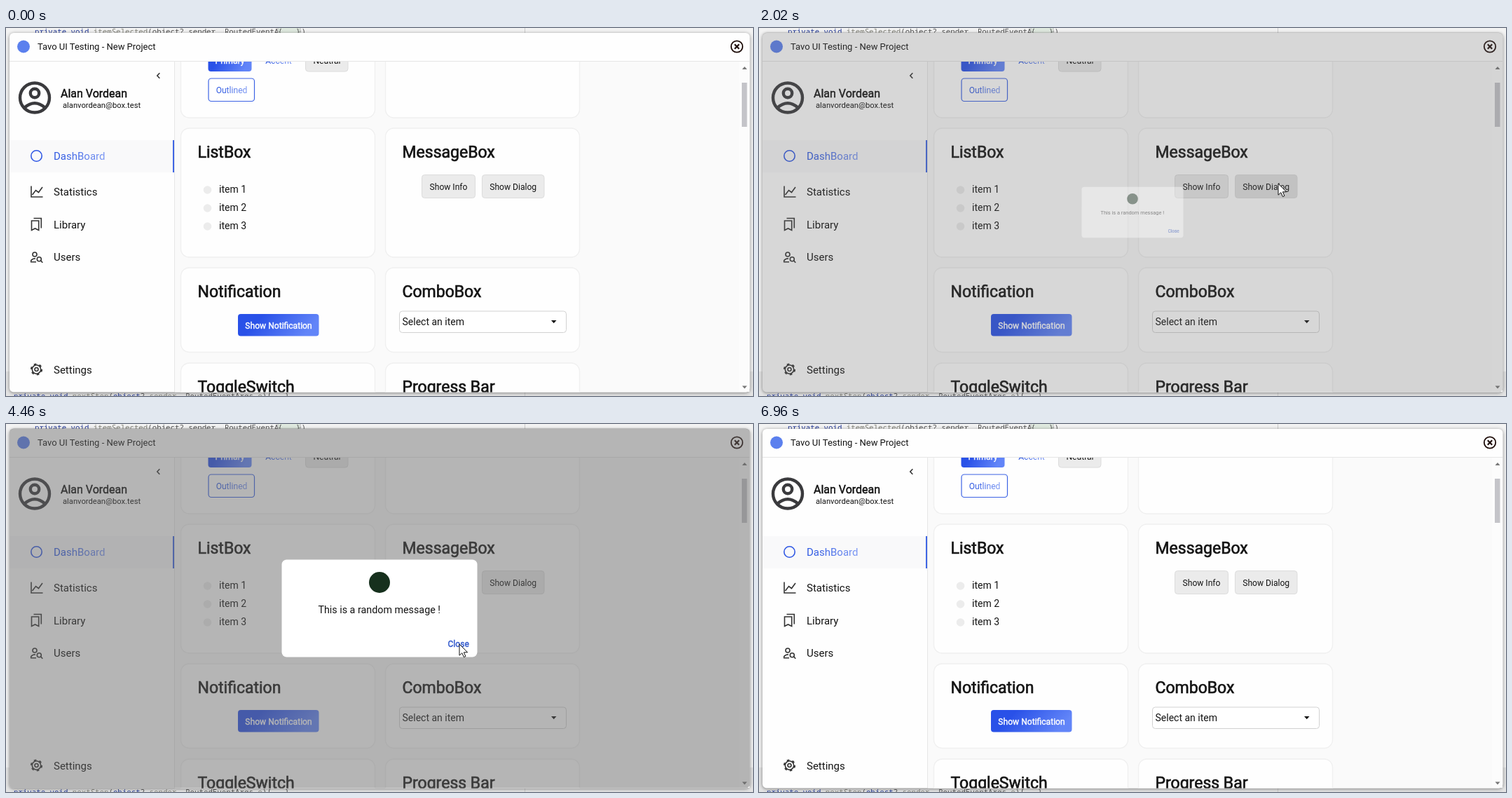
Animation of 1066x525 px, one loop 7.06 s. Source, as an HTML page:

```html
<!DOCTYPE html>
<html lang="en">
<head>
<meta charset="utf-8">
<title>Dashboard dialog</title>
<style>
  html, body { margin: 0; width: 100%; height: 100%; overflow: hidden; background: #f1f1f1; }
  svg { display: block; width: 100vw; height: 100vh; font-family: Roboto, "Noto Sans", sans-serif; fill: #141414; }
  text { white-space: pre; }
  .code { font: 10.75px "Noto Sans Mono", "DejaVu Sans Mono", monospace; fill: #555; }
  .code .key { fill: #2a3f9a; }
  .code .fn { fill: #85857c; }
  .head { font-size: 23px; stroke: #141414; stroke-width: .65px; }
  .nav { font-size: 15px; }
  .item { font-size: 14px; }
  .small { font-size: 12.1px; }
  .bold { stroke: currentColor; stroke-width: .4px; }
  .mid { text-anchor: middle; }
  .white { fill: #fff; color: #fff; }
  .line { fill: none; stroke: #333; stroke-width: 1.6px; }
  .card rect { fill: #fefefe; stroke: #f0f0f0; stroke-width: 1.4px; }
  .grey { fill: #ebebeb; stroke: #dcdcdc; }
  .window { filter: drop-shadow(0 1px 2.5px #0007); }
</style>
</head>
<body>
<svg viewBox="0 0 1066 525" preserveAspectRatio="none">
  <defs>
    <linearGradient id="fill" x2="1" y2=".25">
      <stop offset=".3" stop-color="#2951e8"/><stop offset="1" stop-color="#6285f8"/>
    </linearGradient>
    <linearGradient id="ink">
      <stop offset=".1" stop-color="#2f59e2"/><stop offset="1" stop-color="#7f9af4"/>
    </linearGradient>
    <clipPath id="body"><rect x="241" y="48" width="820" height="471.5"/></clipPath>
  </defs>

  <!-- editor behind the window -->
  <rect width="1066" height="525" fill="#f3f3f3"/>
  <rect y="490" width="1066" height="35" fill="#e4e4e4"/>
  <path d="M740.5 0V525" stroke="#ccc"/>
  <text class="code" x="41" y="8.5"><tspan class="key">private void</tspan> <tspan class="fn">itemSelected</tspan>(object? sender, RoutedEventArgs e)</text>
  <rect x="388" y="-6" width="32" height="15" fill="#dfe9df" stroke="#bbb"/>
  <text class="code" x="388" y="8.5">{...}</text>
  <text class="code" x="11" y="529"><tspan class="key">private void</tspan> <tspan class="fn">nextStep</tspan>(<tspan class="key">object</tspan>? <tspan class="fn">sender</tspan>, RoutedEventArgs <tspan class="fn">e</tspan>){...}</text>

  <rect class="window" x="5" y="7" width="1056.5" height="512.5" rx="6" fill="#fefefe"/>
  <path d="M241 48H1061V513.5Q1061 519.5 1055 519.5H241Z" fill="#fafafa"/>
  <path d="M5 47.5H1061M240.5 48V519" stroke="#e6e6e6"/>

  <!-- title bar -->
  <circle cx="25" cy="26.5" r="9" fill="#5b80ee"/>
  <text x="45" y="31" font-size="13">Tavo UI Testing - New Project</text>
  <g fill="none" stroke="#1c0b08" stroke-width="1.8">
    <circle cx="1043" cy="26.5" r="8.2"/>
    <path d="M1039.8 23.3L1046.2 29.7M1046.2 23.3L1039.8 29.7" stroke-width="2.2"/>
  </g>

  <!-- sidebar -->
  <g class="line" style="stroke:#3a3a3d;stroke-width:4.4px">
    <circle cx="41" cy="99.5" r="21"/><circle cx="41" cy="93" r="6.2"/>
    <path d="M26.5 113.5Q41 101 55.5 113.5"/>
  </g>
  <text class="bold" x="78" y="99" font-size="16">Alan Vordean</text>
  <text x="81" y="114" font-size="11.2">alanvordean@box.test</text>
  <path class="line" d="M219.3 64.3L215.8 68L219.3 71.7"/>
  <rect x="5" y="160" width="233" height="46" fill="#f9f9fa"/>
  <rect x="238" y="160" width="2" height="46" fill="#3f66e4"/>
  <circle class="line" cx="43.5" cy="182.5" r="7.7" style="stroke:#3159e4"/>
  <g class="nav">
    <text x="68" y="188" fill="url(#ink)">DashBoard</text>
    <text x="68" y="239">Statistics</text>
    <text x="68" y="285.5">Library</text>
    <text x="68" y="332">Users</text>
    <text x="68" y="492.5">Settings</text>
  </g>
  <g class="line">
    <path d="M36 225.5V241H52.5M37.5 238L42.5 231.5L46.5 234.5L52 227"/>
    <path d="M36.5 275V288.5L41.5 286L46.7 288.5V275ZM39.5 271.5H50.3V285.5"/>
    <circle cx="41" cy="323" r="3"/><circle cx="47.3" cy="329.7" r="3"/>
    <path d="M43 333.7H35.7V331.7Q37.5 329 42 328.8M49.5 331.9L52.3 334.7"/>
    <circle cx="43.5" cy="487" r="6.2"/><circle cx="43.5" cy="487" r="2.5"/>
    <circle cx="43.5" cy="487" r="7.6" style="stroke-width:2px;stroke-dasharray:3.6 4.36"/>
  </g>

  <!-- cards -->
  <g clip-path="url(#body)">
    <g class="card">
      <rect x="249.5" y="-20" width="277" height="148" rx="12"/><rect x="541.5" y="-20" width="277" height="148" rx="12"/>
      <rect x="249.5" y="143" width="277" height="184" rx="12"/><rect x="541.5" y="143" width="277" height="184" rx="12"/>
      <rect x="249.5" y="342" width="277" height="120.5" rx="12"/><rect x="541.5" y="342" width="277" height="120.5" rx="12"/>
      <rect x="249.5" y="478" width="277" height="120" rx="12"/><rect x="541.5" y="478" width="277" height="120" rx="12"/>
    </g>
    <g class="head">
      <text x="273.5" y="185">ListBox</text><text x="565.5" y="185">MessageBox</text>
      <text x="273.5" y="384">Notification</text><text x="565.5" y="384">ComboBox</text>
      <text x="273.5" y="519.5">ToggleSwitch</text><text x="565.5" y="519.5">Progress Bar</text>
    </g>
    <rect x="288.5" y="30" width="62" height="32" rx="4" fill="url(#fill)"/>
    <rect class="grey" x="427.5" y="30" width="60.5" height="32" rx="4"/>
    <rect x="289" y="72" width="65.5" height="32.5" rx="4" fill="#fff" stroke="#3c63e4" stroke-width="1.2"/>
    <rect x="331" y="408" width="115.5" height="31.5" rx="4" fill="url(#fill)"/>
    <g class="small mid">
      <text class="white bold" x="319.5" y="50.5">Primary</text>
      <text x="389" y="50.5" fill="url(#ink)">Accent</text>
      <text x="458" y="50.5">Neutral</text>
      <text x="322" y="93" fill="url(#ink)">Outlined</text>
      <text class="white bold" x="389" y="428.5">Show Notification</text>
      <rect class="grey" x="593.5" y="209.5" width="76" height="33" rx="4"/>
      <text x="631.5" y="230.5">Show Info</text>
      <g id="button">
        <rect class="grey" x="679.5" y="209.5" width="88.5" height="33" rx="4"/>
        <text x="723.7" y="230.5">Show Dialog</text>
      </g>
    </g>
    <g fill="#ececec"><circle cx="287.5" cy="231" r="5.8"/><circle cx="287.5" cy="257" r="5.8"/><circle cx="287.5" cy="283" r="5.8"/></g>
    <rect x="561.5" y="404" width="238" height="30.5" rx="4" fill="#fff" stroke="#d2d2d2"/>
    <path d="M778 417H785.5L781.7 421.2Z"/>
    <g class="item">
      <text x="304" y="235">item 1</text><text x="304" y="261">item 2</text><text x="304" y="287">item 3</text>
      <text x="565.5" y="424">Select an item</text>
    </g>
    <rect x="1046" y="48" width="15" height="471" fill="#fcfcfc"/>
    <rect x="1050" y="78" width="7.5" height="63" fill="#c4c4c9"/>
    <path d="M1050.5 59H1057.5L1054 55ZM1050.5 510.5H1057.5L1054 514.5Z" fill="#777"/>
  </g>

  <rect id="shade" x="5" y="6.5" width="1056.5" height="513" rx="6" fill="#646464"/>
  <g id="dialog">
    <rect x="393.5" y="193.5" width="279" height="139" rx="7" fill="#fff"/>
    <circle cx="533" cy="226" r="15" fill="#16301d"/>
    <text class="mid" x="532.7" y="269.5" font-size="14.3">This is a random message !</text>
    <text class="small bold" x="630.5" y="318" fill="#3158cc" color="#3158cc">Close</text>
  </g>
  <path id="cursor" d="M0 0V16.2L3.8 12.7L6.4 18.6L8.9 17.5L6.4 11.8H11.6Z" fill="#fff" stroke="#111" stroke-linejoin="round"/>
</svg>
<script>
const LOOP = 7060;
const get = id => document.getElementById(id);
const shade = get('shade'), dialog = get('dialog'), button = get('button'), cursor = get('cursor');
const face = button.querySelector('rect');

// pointer moves: start, end, steps, x, y
const start = [985, 530];
const moves = [
  [370, 460, 2, 960, 500],
  [690, 1390, 10, 745, 231],
  [1470, 1550, 2, 741, 222],
  [3350, 4050, 10, 650, 317],
  [4140, 4210, 2, 647, 314],
  [4690, 5240, 8, 690, 300],
  [5320, 5410, 2, 694, 296],
  [5960, 6660, 10, 970, 505],
  [6730, 6730, 1, 985, 515],
  [6960, 6960, 1, 985, 530]
];

// dialog states: time, shade opacity, scale, opacity
const states = [
  [0, 0, 0, 0],
  [2020, .26, .52, .4],
  [2120, .42, .92, .88],
  [2190, .48, 1, 1],
  [4610, .33, 1, 1],
  [4700, .2, .72, .55],
  [4780, .08, .4, .2],
  [4860, 0, 0, 0]
];

const ease = p => p < .5 ? 4 * p ** 3 : 1 - 4 * (1 - p) ** 3;
const zoom = (s, x, y) => `translate(${x} ${y}) scale(${s}) translate(${-x} ${-y})`;

function pointer(t) {
  let [x, y] = start;
  for (const [from, to, n, tx, ty] of moves) {
    if (t < from) break;
    const step = to > from ? Math.min(n, 1 + Math.floor((t - from) / (to - from) * (n - 1) + 1e-6)) : n;
    const p = ease(step / n);
    x += (tx - x) * p;
    y += (ty - y) * p;
  }
  return [x, y];
}

function draw(t) {
  cursor.setAttribute('transform', `translate(${pointer(t)})`);

  const [, dim, size, alpha] = states.findLast(s => s[0] <= t);
  shade.setAttribute('opacity', dim);
  dialog.setAttribute('opacity', alpha);
  dialog.setAttribute('transform', zoom(size, 533, 263));

  const press = t < 1870 || t >= 2020 ? 1 : t < 1950 ? .975 : .95;
  button.setAttribute('transform', zoom(press, 723.7, 226));
  face.style.fill = t >= 1390 && t < 3400 ? '#e2e2e2' : '';
}

function frame(now) {
  draw(now % LOOP);
  requestAnimationFrame(frame);
}
draw(0);
requestAnimationFrame(frame);
</script>
</body>
</html>
```
